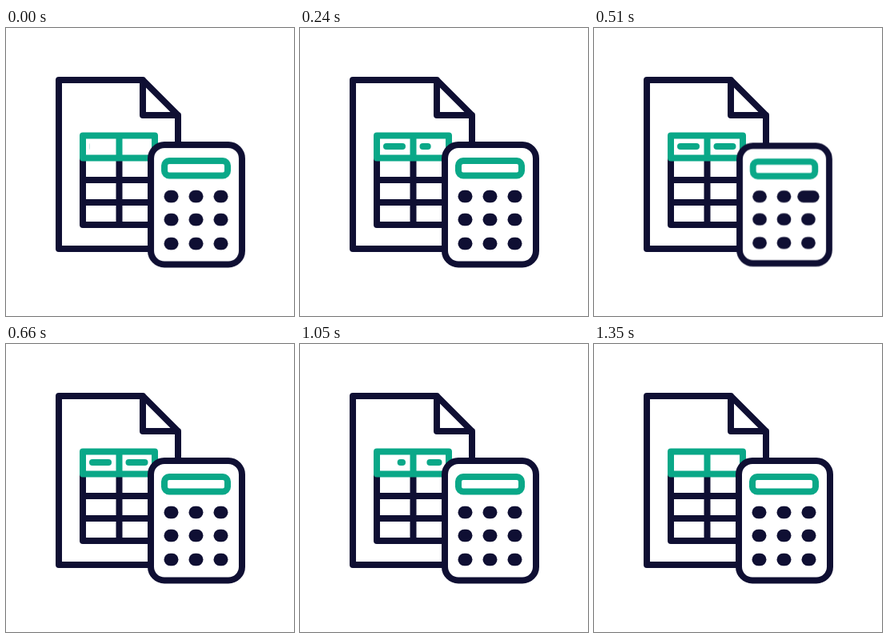
An HTML page that plays this animation: 360x360 px, repeating every 1380 ms.

```html
<!DOCTYPE html>
<html lang="en">
<head>
<meta charset="utf-8">
<title>Spreadsheet and calculator</title>
<style>
  :root { --navy: #0f0f33; --green: #0aa888; --loop: 1380ms; }
  html, body { margin: 0; width: 100%; height: 100%; overflow: hidden; background: #fff; }
  svg { display: block; width: 100%; height: 100%; }
  .line { fill: none; stroke: var(--navy); stroke-width: 8; stroke-linecap: round; stroke-linejoin: round; }
  .accent { stroke: var(--green); }
  .body { fill: #fff; }

  .calc { transform-origin: 238px 221px; animation: push var(--loop) infinite; }
  .keys rect { x: -9px; y: -7.7px; width: 18px; height: 15.4px; rx: 7.7px; fill: var(--navy); }
  .keys .hit { animation: widen var(--loop) var(--at) infinite; }
  .entry { y: 144px; width: 0; height: 8px; rx: 4px; fill: var(--green); }
  .first { animation: first var(--loop) linear infinite; }
  .second { animation: second var(--loop) linear infinite; }

  /* three taps, 390 ms apart */
  @keyframes push {
    0%, 17.39%, 28.26%, 45.65%, 56.52%, 73.91%, 100% {
      transform: scale(1); animation-timing-function: ease-out;
    }
    8.7%, 36.96%, 65.22% { transform: scale(.982); animation-timing-function: ease-in; }
  }
  @keyframes widen {
    0% { x: -9px; width: 18px; animation-timing-function: ease-in; }
    8.7% { x: -14px; width: 28px; animation-timing-function: ease-out; }
    17.39%, 100% { x: -9px; width: 18px; }
  }
  /* entries fill from the left, then clear towards the right */
  @keyframes first {
    0% { x: 104px; width: 0; }
    8%, 67.39% { x: 104px; width: 28px; }
    81.3%, 100% { x: 132px; width: 0; }
  }
  @keyframes second {
    0%, 10.87% { x: 149.5px; width: 0; }
    23.9%, 71.74% { x: 149.5px; width: 28px; }
    85.65%, 100% { x: 177.5px; width: 0; }
  }
</style>
</head>
<body>
<svg viewBox="0 0 360 360">
  <path class="line" d="M190 276H66V65H171L215 109V150M171 65V109H215"/>
  <path class="line" d="M96 163V246H190M141.5 163V246M96 190H190M96 218H190"/>
  <path class="line accent" d="M96 134.5H186V162.5H96ZM141.5 134.5V162.5"/>
  <rect class="entry first"/>
  <rect class="entry second"/>

  <g class="calc">
    <rect class="line body" x="181" y="146" width="114" height="149.5" rx="17"/>
    <rect class="line accent" x="198" y="166" width="79" height="18.5" rx="6"/>
    <g class="keys">
      <rect transform="translate(206.5 210.5)"/>
      <rect transform="translate(237.5 210.5)"/>
      <rect transform="translate(268.5 210.5)" class="hit" style="--at: 390ms"/>
      <rect transform="translate(206.5 239.5)"/>
      <rect transform="translate(237.5 239.5)" class="hit" style="--at: 0ms"/>
      <rect transform="translate(268.5 239.5)"/>
      <rect transform="translate(206.5 269.5)" class="hit" style="--at: 780ms"/>
      <rect transform="translate(237.5 269.5)"/>
      <rect transform="translate(268.5 269.5)"/>
    </g>
  </g>
</svg>
</body>
</html>
```
